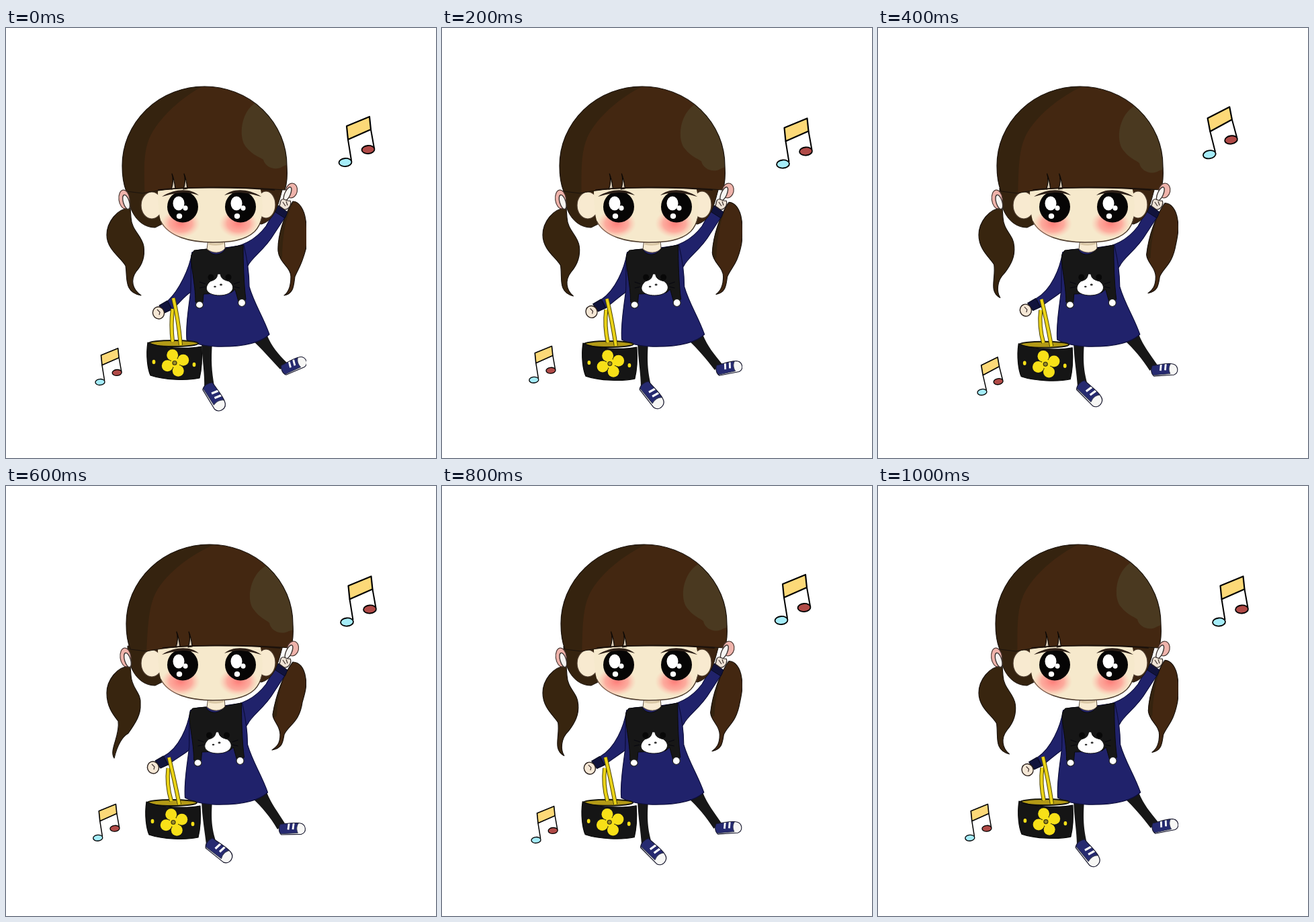
Recreate the animation shown at these times as an HTML page with a canvas. Size 640 by 640 pixels, loop 1.2 s.

```html
<!DOCTYPE html>
<html lang="en">
<head>
<meta charset="utf-8">
<title>Dancing girl</title>
<style>
html, body { margin: 0; width: 100%; height: 100%; overflow: hidden; background: #fff; }
canvas { display: block; width: 100%; height: 100%; }
</style>
</head>
<body>
<canvas id="stage" width="640" height="640"></canvas>
<script>
const ctx = document.getElementById('stage').getContext('2d');
const STEP = 200, BEATS = 6;
const TURN = Math.PI * 2, RAD = Math.PI / 180;

const INK = '#1a130d', HAIR = '#432711', SHADE = '#35230f', SHINE = '#4a3920';
const SKIN = '#f8ead0', BLUE = '#20226b', NAVY = '#11133c', BLACK = '#171717';
const YELLOW = '#f7e018', PINK = '#efb3ab', WHITE = '#fff';

const mix = (a, b, k) => a + (b - a) * k;

function paint(p, fill, line, width = 1.2) {
  if (fill) { ctx.fillStyle = fill; ctx.fill(p); }
  if (line) { ctx.strokeStyle = line; ctx.lineWidth = width; ctx.stroke(p); }
  return p;
}

const shape = (d, ...style) => paint(new Path2D(d), ...style);

function oval(x, y, rx, ry, fill, line, width, tilt = 0) {
  const p = new Path2D();
  p.ellipse(x, y, rx, ry, tilt, 0, TURN);
  return paint(p, fill, line, width);
}

function at(x, y, deg, sx, sy, draw) {
  ctx.save();
  ctx.translate(x, y);
  ctx.rotate(deg * RAD);
  ctx.scale(sx, sy);
  draw();
  ctx.restore();
}

function inside(p, draw) {
  ctx.save();
  ctx.clip(p);
  draw();
  ctx.restore();
}

function note(x, y, deg, size) {
  at(x, y, deg, size, size, () => {
    shape('M4 -34L9 -3M38 -49L43 -21', null, '#000', 2);
    shape('M2 -54L36 -68L38 -49L4 -34Z', '#fcd978', '#000', 2.2);
    oval(0, 0, 9.5, 6, '#a5ecf8', '#000', 1.8, -.08);
    oval(34, -19, 9.5, 6, '#b04a47', '#000', 1.8, -.08);
  });
}

// The notes tremble on odd beats and hop towards each other on the third.
function notes(beat) {
  const hop = beat === 2;
  const d = hop ? -11.7 : beat % 2 * 2.5;
  note(505 + d, 200 + d, hop ? -5 : 0, 1);
  note(140 - d * 1.28, 527 - d * 1.28, hop ? -4 : 0, .74);
}

function tails(s) {
  const k = s ** 1.8;
  const neck = 178 - 11 * k, tip = 201 - 40 * k, end = 398 + 7 * k;
  shape(`M185 268C165 268 150 290 150 308C150 330 ${neck - 6} 342 ${neck} ${354 - 4 * k}
    C${neck + 3} 372 ${tip - 26 + 18 * k} 393 ${tip} ${end}
    C${tip - 12 + 14 * k} ${end - 8} ${184 - 16 * k} 376 ${194 - 12 * k} ${362 + 6 * k}
    C${203 - 10 * k} 352 ${207 - 6 * k} 340 ${205 - 5 * k} 325C202 308 187 302 186 282Z`, '#38250f', INK);

  const x = 414 - 18 * s, y = 398 - 5 * s, mid = 424 - 16 * s;
  const p = shape(`M427 ${258 + 4 * s}C414 278 ${404 - 2 * s} 310 ${405 - 8 * s} ${332 + 8 * s}
    C${407 - 10 * s} 350 ${mid} 356 ${mid} 370C${mid} 384 ${x + 7} ${y - 5} ${x} ${y}
    C${x + 15} ${y - 3} ${mid + 4} 382 ${mid + 6} 370C${mid + 12} 356 ${441 - 4 * s} 352 ${448 - 7 * s} 322
    C${449 - 4 * s} 308 448 298 446 286C444 270 436 ${258 + 4 * s} 427 ${258 + 4 * s}Z`, HAIR);
  inside(p, () => shape(`M${430 - 8 * s} 255C414 285 ${412 - 8 * s} 310 ${411 - 8 * s} 342L390 350L395 255Z`, SHADE));
  paint(p, null, INK);
}

function shoe(x, y, deg, size) {
  at(x, y, deg, size, size, () => {
    const p = shape('M-4 -9C8 -9 20 -11 29 -9C40 -7 41 7 31 10L-3 9C-8 4 -7 -4 -4 -9Z', '#262a70');
    inside(p, () => {
      shape('M-10 7.5L25 7.5C22 0 24 -7 30 -12L45 -12L45 14L-10 14Z', '#f7f7f5', '#333850', 1);
      shape('M11 -10L9 1M19 -10L17 1', null, WHITE, 3.2);
    });
    paint(p, null, '#17172c');
  });
}

function legs(s, e) {
  const lx = 302 + 3 * s, ly = 536 - 2.5 * e;
  const rx = 416 - 4 * e, ry = 508 + 3 * s;
  shape(`M291 468L307 468C305 495 306 510 ${lx + 8} ${ly - 3}L${lx - 7} ${ly}C296 515 292 495 291 468Z`, BLACK);
  shape(`M366 464L388 456C396 475 404 484 ${rx + 3} ${ry - 9}L${rx - 8} ${ry}C393 492 381 478 366 464Z`, BLACK);
  shoe(lx, ly, 57 - 20 * s, 1);
  shoe(rx, ry, -25 + 22 * e, .88);
}

function cat() {
  shape('M280 331L300 329C305 340 321 340 327 328L353 323C353 350 354 380 357 404L346 407L341 389L335 394L294 396L293 408L282 408C282 380 274 352 276 338Z', BLACK, '#0a0a0a', 1);
  for (const side of [-1, 1]) {
    oval(318 + side * 13, 371, 4.5, 4.5, '#080808');
    oval(318 + side * 6, 384, 1.6, 1.3, '#222');
    shape(`M${318 + side * 21} 381l${side * 9} -3m${side * -9} 7l${side * 9} 2`, null, '#080810');
  }
  shape('M315 366L319 366C320 373 324 375 332 377C344 386 336 398 318 398C300 398 292 388 304 377C311 375 314 373 315 366Z', WHITE, '#111', 1);
  oval(311, 385, 1.8, 1.3, '#333');
  oval(320, 382, 2, 1.5, '#333');
  oval(288, 412, 5.5, 5, WHITE, '#222');
  oval(351, 409, 5.5, 5.5, WHITE, '#222');
}

function body(e, cx, cy) {
  const b = -2.5 * e;
  shape('M326 327C350 327 372 315 387 295L402 268L417 279L398 308C385 330 365 342 360 354L345 375Z', BLUE, '#0d0e3c');
  shape('M402 267L406 264L419 274L415 283L401 274Z', NAVY, '#080a20', 1);
  shape(`M${277 + b} 334C${273 + b} 358 258 390 ${cx + 3} ${cy - 9}L${cx + 9} ${cy + 4}C${cx + 20} ${cy - 5} 264 400 ${275 + b} 393Z`, BLUE, '#0d0e3c');
  at(b, 0, 0, 1, 1, () => {
    shape('M277 334C284 329 292 330 300 329L327 327L354 323C358 340 362 360 362 385C370 412 382 428 392 456C375 472 340 475 310 474C292 473 278 469 269 464C267 440 273 410 275 390C276 370 274 350 277 334Z', BLUE, '#0d0e3c');
    cat();
  });
  shape('M301 314L325 314L326 328C320 336 307 336 299 329Z', SKIN, '#5e5043', 1);
  shape('M302 321C310 323 317 323 324 320', null, '#d9c7a5', 3);
}

function hand(e, cx, cy) {
  const x = 227 - 8 * e, y = 424 - 5 * e * e;
  shape(`M${cx - 10} ${cy - 2}L${cx + 2} ${cy - 9}L${cx + 9} ${cy + 4}L${cx - 2} ${cy + 9}Z`, NAVY, '#080a20');
  oval(x, y, 8.5, 9, '#f5e7d5', '#2b211d', 1.4, -.4);
  shape(`M${x - 2} ${y - 5}l4 4l-1 4`, null, '#403230');
}

function strap(d) {
  shape(d, null, '#4b4208', 6.2);
  shape(d, null, '#ead317', 4.2);
}

function bag(e) {
  const top = 247 - 4.5 * e;
  at(-2 * e, 2 * e, 0, 1, 1, () => {
    oval(249, 469.5, 37, 4.5, '#b39a16', '#18170c', 2);
    strap(`M${top + 1} 418Q${top - 2} 442 248 467`);
    shape('M211 468C208 488 211 508 215 517C235 524 270 525 288 521C292 505 292 490 291 474C270 478 230 477 211 468Z', '#151515', '#080808');
    for (let a = -110; a < 250; a += 90)
      oval(252 + 12.5 * Math.cos(a * RAD), 498.5 + 12.5 * Math.sin(a * RAD), 8.5, 8.5, YELLOW);
    oval(252, 498.5, 7, 7, YELLOW);
    oval(251, 498.5, 3, 3, '#9a8c2b', '#3d380d');
    oval(220, 497, 2.4, 3.2, YELLOW);
    oval(280, 501, 2.4, 3.2, YELLOW);
    strap(`M${top + 2} 402Q${top + 9} 430 260 472`);
  });
}

function cheek(x) {
  at(x, 291, 0, 1, .74, () => {
    const g = ctx.createRadialGradient(0, 0, 2, 0, 0, 29);
    g.addColorStop(0, 'rgba(255,126,122,.95)');
    g.addColorStop(.55, 'rgba(255,148,140,.72)');
    g.addColorStop(1, 'rgba(255,190,170,0)');
    oval(0, 0, 29, 29, g);
  });
}

function eye(x, side) {
  oval(x, 266, 23, 23.5, '#060505');
  oval(x - 6, 261, 8.5, 10.5, WHITE);
  oval(x + 4, 268, 3.6, 3.8, WHITE);
  oval(x - 5, 280, 4.2, 4, WHITE);
  at(x, 266, 0, side, 1, () => shape('M-24 -17C-12 -27 10 -28 31 -15C20 -18 12 -20 0 -21C-10 -21 -17 -19 -24 -17Z', '#2b1e16'));
}

function face() {
  shape('M181 238C180 270 196 297 222 297L240 288L240 238Z', SHADE, INK, 1);
  shape('M370 238L412 238C406 258 402 286 380 292L365 288Z', '#3b2410', INK, 1);
  oval(217, 264, 16, 20, SKIN, '#4c3a2c');
  oval(387, 263, 14, 20, SKIN, '#4c3a2c');
  const p = shape('M226 236L378 236C384 262 384 288 370 303C355 317 332 319 308 319C275 319 245 311 232 292C227 280 226 262 226 236Z', '#f6e9cc');
  shape('M230 287C242 311 275 319 308 319C332 319 355 317 370 303C376 297 379 290 381 282', null, '#4c3a2c', 1.4);
  inside(p, () => { cheek(260); cheek(346); });
  eye(263, -1);
  eye(349, 1);
}

function hair(s) {
  at(173 + 6 * s, 0, 0, 1 + .012 * s, 1, () => {
    ctx.translate(-173, 0);
    const p = shape('M179 243C174 230 173 216 173 205A122.5 118 0 0 1 418 205C419 220 418 232 415 241C375 238 325 236 275 238C248 239 222 242 203 246Z', HAIR);
    inside(p, () => at(295, 205, 5 * s, 1, 1, () => {
      shape('M5 -122C-25 -108 -67 -75 -82 -40C-92 -15 -89 15 -88 60L-160 60L-150 -125Z', SHADE);
      shape('M75 -93C53 -77 51 -40 63 -27C73 -15 83 -13 88 -9C91 3 107 8 117 1L140 -9L137 -95Z', SHINE);
    }));
    paint(p, null, INK);
    for (const x of [247, 265]) shape(`M${x} 217C${x + 3} 226 ${x + 1} 234 ${x - 1} 240L${x + 5} 239C${x + 4} 231 ${x + 3} 224 ${x} 217Z`, '#d9cbb6', '#0c0805');
    shape('M226 241C260 237 340 236 400 241', null, '#1c110a', 1.8);
  });
}

function ties(s) {
  at(2 * s, 0, 0, 1, 1, () => {
    oval(176, 255, 8, 14, PINK, '#4b3833', 1.2, -.12);
    oval(179, 259, 4.5, 11, '#f6f4f2', '#3d3532', 1.4, -.3);
    oval(425, 242, 8.5, 11, PINK, '#4b3833', 1.2, .2);
    oval(419, 247, 4.2, 11, '#f6f4f2', '#3d3532', 1.4, .42);
  });
  shape('M409 257C412 251 418 259 423 257C426 263 420 271 414 270L407 265Z', '#eee3d6', '#2c2320');
  shape('M412 259l4 6m1 -7l2 6', null, '#3e302b');
}

function frame() {
  const beat = Math.floor(performance.now() / STEP) % BEATS;
  const sway = 1 - Math.abs(3 - beat) / 3;
  const ease = 1 - (1 - sway) ** 2;
  const cx = mix(238, 232, ease), cy = mix(415, 411, ease);
  ctx.fillStyle = WHITE;
  ctx.fillRect(0, 0, 640, 640);
  ctx.lineJoin = 'round';
  notes(beat);
  ctx.save();
  ctx.beginPath();
  ctx.rect(0, 0, 447, 640);
  ctx.clip();
  tails(sway);
  legs(sway, ease);
  body(ease, cx, cy);
  hand(ease, cx, cy);
  bag(ease);
  face();
  hair(sway);
  ties(sway);
  ctx.restore();
  requestAnimationFrame(frame);
}
frame();
</script>
</body>
</html>
```
